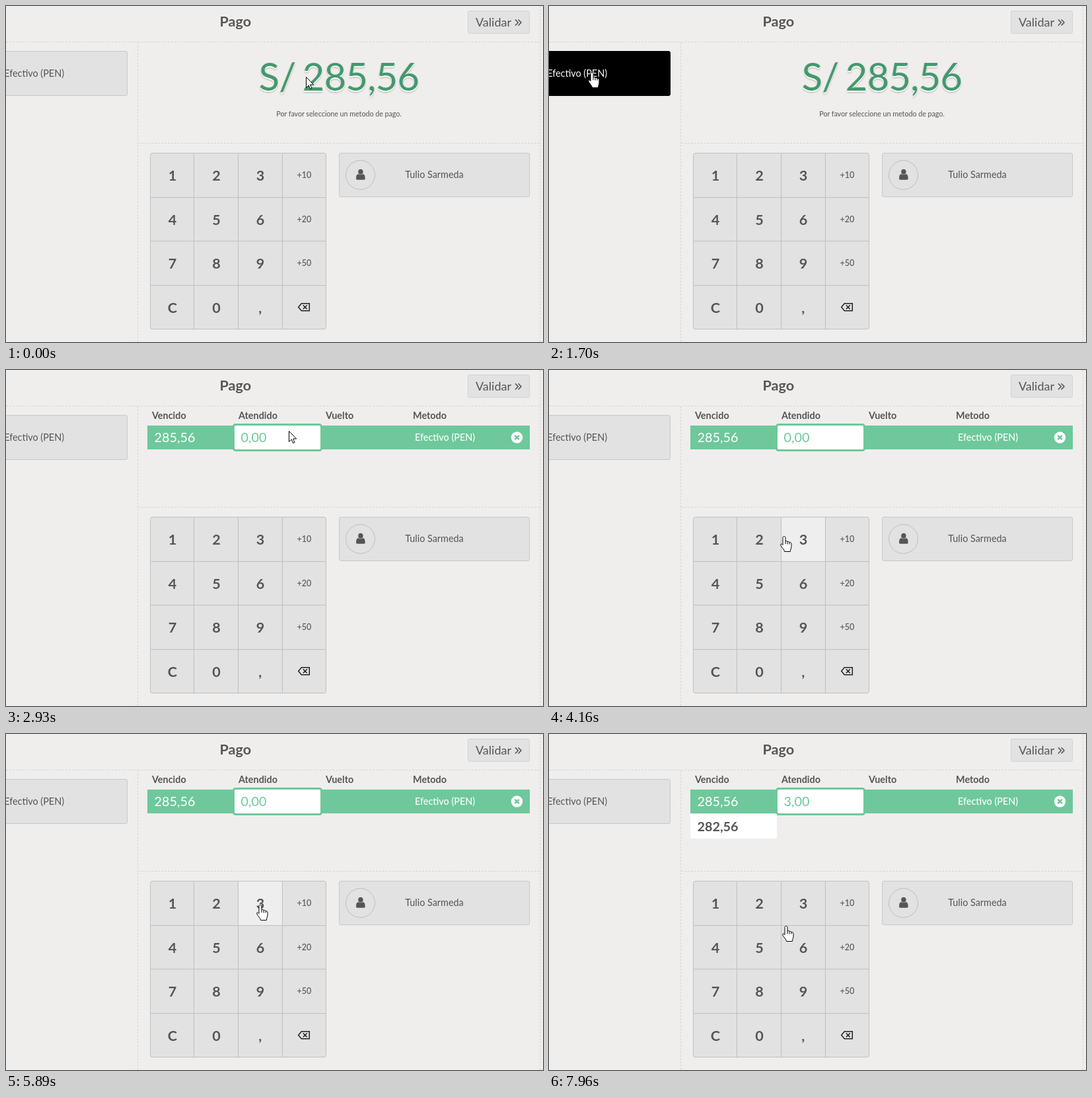
An HTML page for the animation above (8 s loop, 813x508 px).

```html
<!DOCTYPE html>
<html lang="es">
<head>
<meta charset="utf-8">
<title>Pago</title>
<style>
  html, body { margin: 0; width: 100%; height: 100%; overflow: hidden; background: #f0eeec; }
  svg { display: block; }
  text { font-family: Lato, "Open Sans", sans-serif; font-size: 14.4px; fill: #555; white-space: pre; }
  .mid { text-anchor: middle; }
  .bold { font-weight: bold; }
  .big { font-size: 21.6px; font-weight: bold; }
  .step { font-size: 12.6px; font-weight: 500; }
  .sum { font-size: 19.8px; }
  .light { fill: #fff; font-weight: 500; }
  .box { fill: #e2e2e2; stroke: #c8c8c8; }
  .dash { fill: none; stroke: #d6d5d3; stroke-dasharray: 3 2; }
  .line { fill: none; stroke: #bfbfbf; }
  .green { fill: #6ec89b; }
  #total {
    font-size: 57.6px; letter-spacing: -.6px; word-spacing: -4px; fill: #43996e;
    filter: drop-shadow(0 2px 0 #fff) drop-shadow(0 1px 1px rgba(0, 0, 0, .25));
  }
  #hint { font-size: 10.8px; letter-spacing: -.07px; }
  #method.down rect { fill: #000; stroke: #000; }
  #method.down text { fill: #fff; }
  .pointer { fill: #fff; stroke: #000; stroke-linejoin: round; }
</style>
</head>
<body>
<svg width="813" height="508" viewBox="0 0 813 508">
  <path class="dash" d="M0 54.5H808M199.5 55V508M808.5 0V508M200 207.5H808"/>

  <text class="big mid" x="347.3" y="31">Pago</text>
  <rect class="box" x="699.5" y="7.5" width="93" height="34" rx="2.5" style="stroke:#d3d3d3"/>
  <text x="711" y="31" style="font-size:18px">Validar</text>
  <path d="M771 20.5l4.3 4.5-4.3 4.5M775.6 20.5l4.3 4.5-4.3 4.5" fill="none" stroke="#555" stroke-width="1.6"/>

  <g id="method">
    <rect class="box" x="-10.5" y="68.5" width="194" height="67" rx="2.5"/>
    <text x="88" y="107" text-anchor="end">Efectivo (PEN)</text>
  </g>

  <g id="prompt">
    <text id="total" class="mid" x="504" y="128">S/ 285,56</text>
    <text id="hint" class="mid" x="504" y="167">Por favor seleccione un metodo de pago.</text>
  </g>

  <g id="table">
    <g class="bold">
      <text x="221" y="74">Vencido</text>
      <text x="352" y="74">Atendido</text>
      <text x="484" y="74">Vuelto</text>
      <text x="616" y="74">Metodo</text>
    </g>
    <rect class="green" x="214" y="84" width="579" height="36"/>
    <text class="sum" x="224.5" y="109" style="fill:#fff">285,56</text>
    <rect x="344.5" y="82.5" width="133" height="39" rx="3" fill="#fff" stroke="#6ec89b" stroke-width="3"/>
    <text id="paid" class="sum green" x="355.5" y="109">0,00</text>
    <text class="light" x="619" y="107">Efectivo (PEN)</text>
    <circle cx="773.5" cy="102" r="8.7" fill="#fff"/>
    <path d="M770.3 98.8l6.4 6.4m0-6.4l-6.4 6.4" stroke="#6ec89b" stroke-width="2.6"/>
    <g id="rest">
      <path d="M214 121H345V155a3 3 0 0 1-3 3H217a3 3 0 0 1-3-3Z" fill="#fff"/>
      <text class="sum bold" x="224.5" y="147">282,56</text>
    </g>
  </g>

  <g transform="translate(218.5 222.5)">
    <rect width="266" height="266" rx="3" fill="#e2e2e2"/>
    <rect id="hover" width="66.5" height="66.5"/>
    <path class="line" d="M66 0V266M133 0V266M200 0V266M0 67H266M0 133H266M0 200H266"/>
    <rect class="line" width="266" height="266" rx="3"/>
    <g id="keys"></g>
    <path d="M224.2 232.7l4.6-5.5h12v11h-12zM231.3 229.7l6 6m0-6l-6 6" fill="none" stroke="#222" stroke-width="1.5"/>
  </g>

  <rect class="box" x="504.5" y="222.5" width="288" height="66" rx="2.5"/>
  <circle class="line" cx="536.5" cy="255.5" r="22"/>
  <path d="M530.2 262c-.5-5 .8-7.500 3-8 2 1.600 5.400 1.600 7.400 0 2.200.5 3.500 3 3 8q-.6.800-2 .8h-9.400q-1.400 0-2-.8z" fill="#555"/>
  <ellipse cx="536.9" cy="250.7" rx="3.7" ry="4" fill="#555"/>
  <text class="mid" x="648.5" y="260">Tulio Sarmeda</text>

  <path id="arrow" class="pointer" d="M.5 .5V16.5L4.200 13L6.700 18.500L9 17.500L6.600 12H11.700Z"/>
  <g id="hand" class="pointer">
    <path d="M0 .5C1.200 .5 2 1.300 2 2.500V8C2.500 7 5 7.200 5 8.800C5.600 8 7.800 8.200 8 9.800C9 9.200 11 9.800 11 11.800V16C11 18.500 9.500 20 9.300 23.500H.6C.2 20.500-3.500 17.500-5.200 14C-6 12-3.800 11-2 13.500V2.500C-2 1.300-1.200 .5 0 .5Z"/>
    <path d="M2 8V12M5 9V12.500M8 10V12.500" fill="none"/>
  </g>
</svg>
<script>
  const LOOP = 8000, TICK = 130;
  const PAD = { x: 218.5, y: 222.5, cell: 66.5 };
  const PRESS_METHOD = 1700, SHOW_TABLE = 1940, PRESS_KEY = 7660, TYPED = 7810;
  const $ = id => document.getElementById(id);

  // turning points of the pointer: time, x, y
  const path = [
    [260, 454, 107], [520, 334, 137], [780, 101, 153], [1040, 27, 106], [1430, 60, 100],
    [2210, 76, 99], [2600, 454, 128], [2860, 428, 92], [3250, 428, 92], [3770, 416, 101],
    [4160, 356, 251], [4420, 341, 231], [4600, 319, 290], [4810, 344, 292], [4940, 344, 292],
    [5070, 379, 270], [5330, 385, 260], [6760, 385, 255], [7800, 385, 255], [7930, 359, 290]
  ];

  function pointerAt(time) {
    const t = Math.floor(time / TICK) * TICK;
    const next = path.findIndex(p => p[0] > t);
    if (next < 1) return path.at(next).slice(1);
    const [t0, ...from] = path[next - 1], [t1, ...to] = path[next];
    const part = (t - t0) / (t1 - t0);
    return from.map((v, i) => Math.round(v + (to[i] - v) * part));
  }

  const keys = "1 2 3 +10 4 5 6 +20 7 8 9 +50 C 0 ,".split(" ").map((label, i) => {
    const key = document.createElementNS("http://www.w3.org/2000/svg", "text");
    const small = label.length > 1;
    key.textContent = label;
    key.setAttribute("class", small ? "mid step" : "mid big");
    key.setAttribute("x", 33.4 + (i % 4) * 66.5);
    key.setAttribute("y", (small ? 37.5 : 41.5) + (i >> 2) * 66.6);
    return $("keys").appendChild(key);
  });

  const show = (id, on) => { $(id).style.display = on ? "" : "none"; };

  function draw(t) {
    const [x, y] = pointerAt(t);
    const col = Math.floor((x - PAD.x) / PAD.cell);
    const row = Math.floor((y - PAD.y) / PAD.cell);
    const onKey = Math.min(col, row) >= 0 && Math.max(col, row) < 4;
    const onMethod = x < 184 && y >= 68 && y < 136;
    const typed = t >= TYPED;
    const pressed = t >= PRESS_KEY && !typed;

    const pointer = onKey || onMethod ? "hand" : "arrow";
    show("hand", pointer === "hand");
    show("arrow", pointer === "arrow");
    $(pointer).setAttribute("transform", `translate(${x} ${y})`);

    $("method").classList.toggle("down", t >= PRESS_METHOD && t < PRESS_METHOD + 120);
    show("prompt", t < SHOW_TABLE);
    show("table", t >= SHOW_TABLE);
    show("rest", typed);
    $("paid").textContent = typed ? "3,00" : "0,00";

    show("hover", onKey && !typed);
    $("hover").setAttribute("transform", `translate(${col * PAD.cell} ${row * PAD.cell})`);
    $("hover").setAttribute("fill", pressed ? "#000" : "#eee");
    keys[2].style.fill = pressed ? "#fff" : "";
  }

  function tick() {
    draw(performance.now() % LOOP);
    requestAnimationFrame(tick);
  }
  tick();
</script>
</body>
</html>
```
